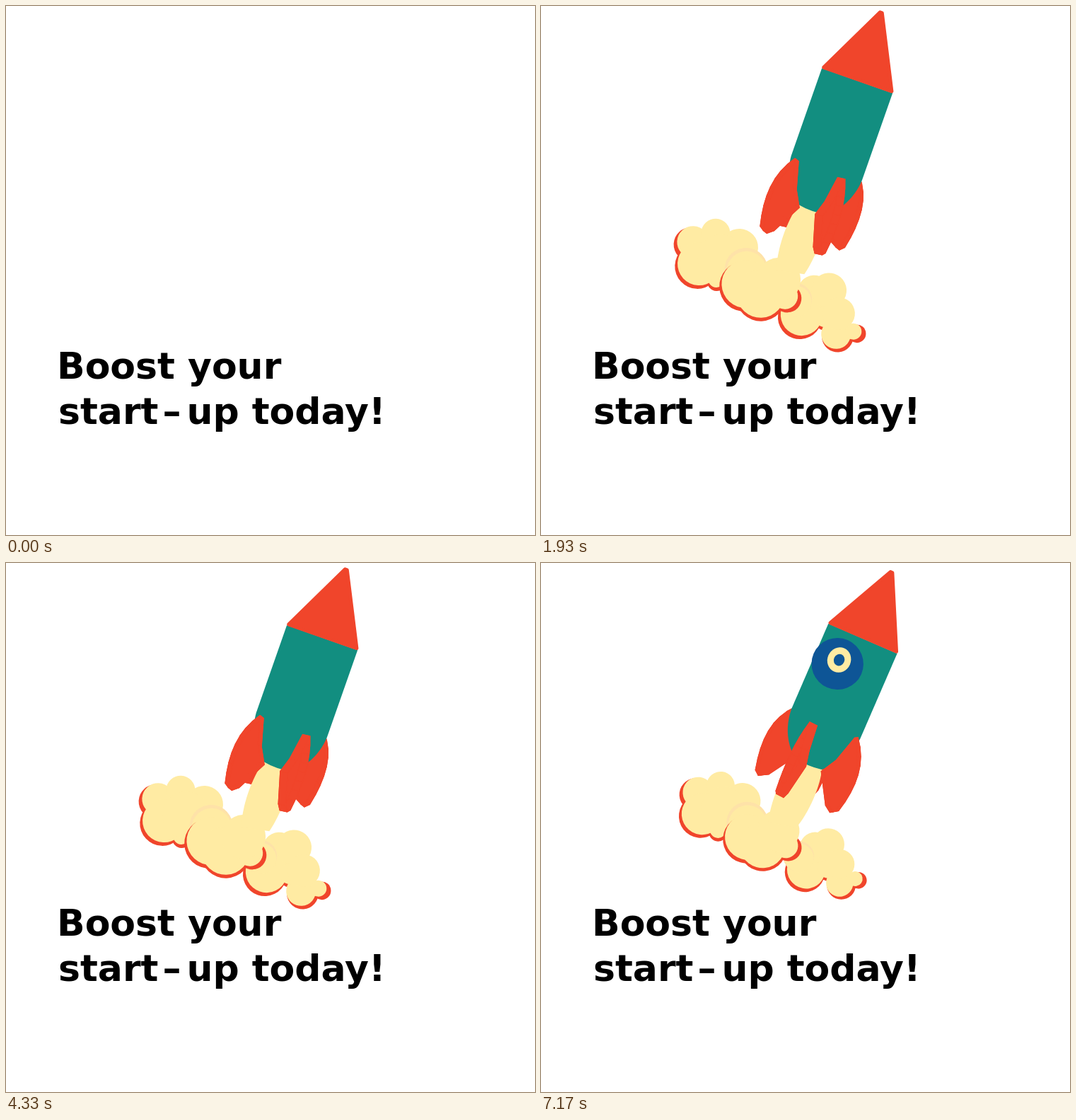
Animation of 748 by 748 pixels, one loop 7210 ms. Source, as an HTML page with a canvas:

```html
<!DOCTYPE html>
<html lang="en">
<head>
<meta charset="utf-8">
<title>Boost your start-up</title>
<style>
  html, body { margin: 0; width: 100%; height: 100%; overflow: hidden; background: #fff; }
  svg, canvas { position: absolute; left: 0; top: 0; width: 748px; height: 748px; }
  text { font: bold 52px "DejaVu Sans", sans-serif; fill: #000; }
</style>
</head>
<body>
<svg viewBox="0 0 748 748">
  <text x="72" y="527">Boost your</text>
  <text x="74" y="591">start<tspan dx="6">–</tspan><tspan dx="8">up today!</tspan></text>
</svg>
<canvas id="stage" width="748" height="748"></canvas>
<script>
const LOOP = 7210, SWAY = 2400, SPIN = 1200;
const RED = '#f0452b', TEAL = '#128e80', BLUE = '#0e5596', CREAM = '#ffeba3', PEACH = '#fee2a8';
const ctx = document.getElementById('stage').getContext('2d');
const TAU = Math.PI * 2, rad = d => d * Math.PI / 180;
const wave = (t, peak, period) => Math.cos((t - peak) / period * TAU);
const mix = (a, b, k) => a + (b - a) * k;

// Pops up past full size, then settles
function popSize(t) {
  const u = Math.min((t - 30) / 700, 1) - 1, back = 2.2;
  return t < 30 ? 0 : Math.max(0, 1 + (back + 1) * u ** 3 + back * u * u);
}

// Puffs swell between small (centre, scale, tilt) and big (centre).
// Lobes are [x, y, r]: rim lobes cast a red edge, the last top lobe a soft one.
const CLOUDS = [
  { big: [243, 355], small: [252, 341], scale: .94, tilt: 8,
    rim: [[211, 339, 23], [221, 370, 31], [247, 391, 12]],
    top: [[243, 325, 21], [278, 344, 27], [252, 360, 34], [290, 378, 29]] },
  { big: [393, 438], small: [400, 427], scale: .85, tilt: -13,
    rim: [[365, 438, 31], [400, 443, 16], [414, 470, 22], [440, 468, 12]],
    top: [[386, 406, 25], [408, 405, 26], [420, 440, 24], [358, 418, 23]] },
  { big: [308, 410], small: [313, 396], scale: .91, tilt: -8,
    rim: [[288, 396, 35], [309, 411, 35], [344, 416, 19]],
    top: [[336, 392, 32]] }
];

function dot(x, y, r, color) {
  ctx.fillStyle = color;
  ctx.beginPath();
  ctx.arc(x, y, r, 0, TAU);
  ctx.fill();
}

function drawCloud({ big, small, scale, tilt, rim, top }, k) {
  const s = mix(scale, 1, k);
  ctx.save();
  ctx.translate(mix(small[0], big[0], k), mix(small[1], big[1], k));
  ctx.rotate(rad(tilt * (1 - k)));
  ctx.scale(s, s);
  ctx.translate(-big[0], -big[1]);
  rim.forEach(([x, y, r]) => dot(x + (x - big[0]) * .1, y + 3.5, r + 1.5, RED));
  rim.forEach(lobe => dot(...lobe, CREAM));
  top.forEach(([x, y, r], i) => {
    if (i === 3) dot(x - 1, y - 3, r + 2, PEACH);
    dot(x, y, r, CREAM);
  });
  ctx.restore();
}

function polygon(pts) {
  ctx.beginPath();
  pts.forEach(p => ctx.lineTo(...p));
  ctx.closePath();
  ctx.fill();
  ctx.stroke();
}

function bezier(a, b, c, d, u) {
  const v = 1 - u;
  return v * v * v * a + 3 * v * v * u * b + 3 * v * u * u * c + u * u * u * d;
}

// Fin outline as [distance from axis, height]: curved outer edge, then tip and inner edge
const FIN = Array.from({ length: 9 }, (_, i) =>
  [bezier(50, 76, 78, 67, i / 8), bezier(22, 50, 85, 127, i / 8)]
).concat([[60, 132], [50, 126], [24, 86], [38, 62]]);

function drawFin(angle) {
  const s = Math.sin(angle), c = Math.cos(angle);
  const face = w => FIN.map(([r, y]) => [r * s + w * c, y + .2 * (r * c - w * s)]);
  const a = face(-6), b = face(6);
  ctx.fillStyle = ctx.strokeStyle = RED;
  ctx.lineWidth = 1.2;
  ctx.lineJoin = 'round';
  polygon(a);
  polygon(b);
  a.forEach((p, i) => {
    const j = (i + 1) % a.length;
    polygon([p, a[j], b[j], b[i]]);
  });
}

function oval(x, y, rx, ry, color) {
  ctx.fillStyle = color;
  ctx.beginPath();
  ctx.ellipse(x, y, rx, ry, 0, 0, TAU);
  ctx.fill();
}

function drawWindow(angle) {
  const x = 58 * Math.sin(angle), c = Math.cos(angle);
  oval(x, -60, Math.hypot(37 * Math.max(c, 0), 11), 36.5, BLUE);
  if (c > .1) {
    oval(x, -66, 17.5 * c, 18, CREAM);
    oval(x, -66, 8 * c, 8.5, BLUE);
  }
}

function drawFlame(t) {
  const w = 24 + 4 * wave(t, 960, SPIN);
  ctx.fillStyle = CREAM;
  ctx.beginPath();
  ctx.moveTo(-19, 80);
  ctx.bezierCurveTo(-w - 2, 110, -w - 4, 145, -20, 184);
  ctx.lineTo(20, 176);
  ctx.bezierCurveTo(w + 2, 148, w + 3, 110, 19, 80);
  ctx.fill();
}

function drawBody() {
  ctx.fillStyle = TEAL;
  ctx.beginPath();
  ctx.moveTo(-53, -107);
  ctx.lineTo(53, -107);
  ctx.lineTo(53, 24);
  ctx.bezierCurveTo(51, 52, 38, 74, 20, 86);
  ctx.quadraticCurveTo(0, 90, -20, 86);
  ctx.bezierCurveTo(-38, 74, -51, 52, -53, 24);
  ctx.fill();
  ctx.fillStyle = ctx.strokeStyle = RED;
  ctx.lineWidth = 5;
  ctx.lineJoin = 'round';
  polygon([[-51, -109], [51, -109], [1.5, -209], [-1.5, -209]]);
}

function drawRocket(t) {
  const turn = rad(t / SPIN * 360 - 10);
  const fins = [0, 1, 2, 3].map(i => turn + i * Math.PI / 2)
    .sort((a, b) => Math.cos(a) - Math.cos(b));
  const behind = a => Math.cos(a) < -.02;
  const windowBehind = Math.cos(turn) < .12;
  const bob = wave(t, 1080, SWAY);
  ctx.save();
  ctx.translate(410.5 - 2 * bob, 209.2 + 4.3 * bob);
  ctx.rotate(rad(24.5 + 5.3 * wave(t, 650, SWAY)));
  fins.filter(behind).forEach(drawFin);
  drawFlame(t);
  if (windowBehind) drawWindow(turn);
  drawBody();
  fins.filter(a => !behind(a)).forEach(drawFin);
  if (!windowBehind) drawWindow(turn);
  ctx.restore();
}

function draw(t) {
  const size = popSize(t), puff = .75 + .85 * wave(t, 420, SPIN);
  ctx.clearRect(0, 0, 748, 748);
  if (!size) return;
  ctx.save();
  ctx.translate(350, 230);
  ctx.scale(size, size);
  ctx.translate(-350, -230);
  CLOUDS.forEach(c => drawCloud(c, puff));
  drawRocket(t);
  ctx.restore();
}

const start = performance.now();
function tick() {
  draw((performance.now() - start) % LOOP);
  requestAnimationFrame(tick);
}
tick();
</script>
</body>
</html>
```
